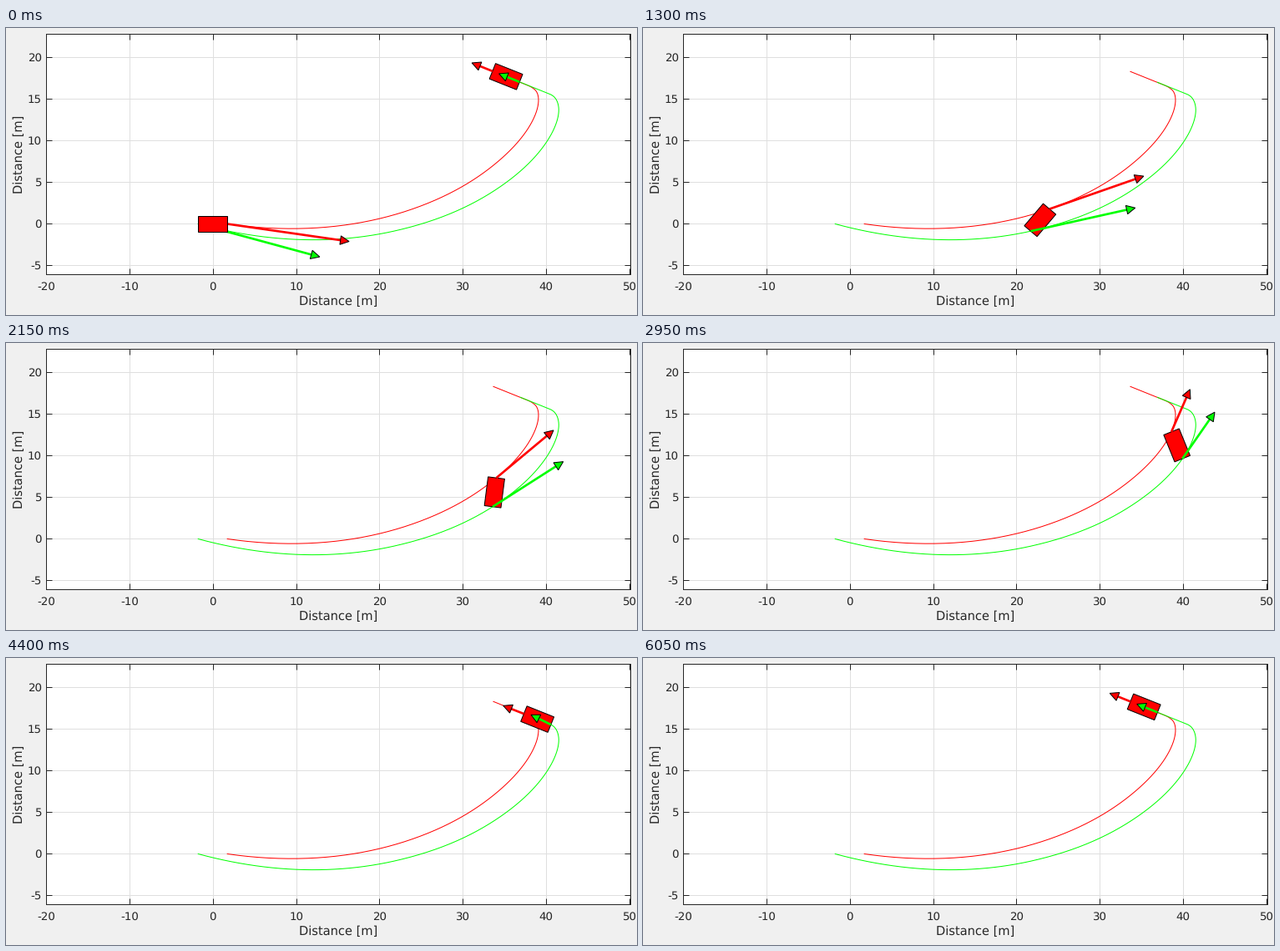
A matplotlib script that plays this animation: 756x345 px, repeating every 6100 ms.

```python
import numpy as np
import matplotlib.pyplot as plt
from matplotlib.animation import FuncAnimation
from matplotlib.transforms import Affine2D

W, H, DPI = 756, 345, 96
PX = 72 / DPI            # one pixel in points
SCALE = 9.986            # pixels per metre
FRAMES, STEP = 122, 0.05
RED, GREEN, INK = "#ff0000", "#00ff00", "#262626"

LF, LR, HALF_W = 1.7, 1.8, 1.0   # centre of mass to front, rear and side
GAIN, HEAD = 0.675, 1.05         # arrow length per speed, arrow head size

# Drift manoeuvre: time, x, y, heading, and the rates of the last three
KNOTS = np.array([
    (0.00,  0.00,  0.00,   0.0, 20.10, -4.15, 42.0),
    (1.25, 22.82,  0.50,  49.7, 16.14,  4.60, 38.7),
    (2.10, 33.76,  5.66,  82.7, 10.07,  7.35, 37.5),
    (2.90, 39.18, 11.32, 112.1,  3.74,  6.57, 38.5),
    (3.70, 39.99, 15.13, 143.8, -1.17,  2.70, 38.5),
    (4.40, 38.74, 16.28, 158.2, -2.22,  0.895, 0.0),
    (6.00, 35.20, 17.71, 158.2, -2.22,  0.895, 0.0),
])


def state(t):
    """Cubic Hermite value and rate of (x, y, heading)."""
    i = int(np.clip(np.searchsorted(KNOTS[:, 0], t) - 1, 0, len(KNOTS) - 2))
    a, b = KNOTS[i], KNOTS[i + 1]
    dt = b[0] - a[0]
    s = (t - a[0]) / dt
    p0, p1, m0, m1 = a[1:4], b[1:4], a[4:] * dt, b[4:] * dt
    c2 = 3 * (p1 - p0) - 2 * m0 - m1
    c3 = 2 * (p0 - p1) + m0 + m1
    return (p0 + s * (m0 + s * (c2 + s * c3)),
            (m0 + s * (2 * c2 + 3 * s * c3)) / dt)


def axles(t):
    """Side direction plus position and velocity of the front and rear points."""
    (x, y, h), (vx, vy, w) = state(t)
    h, w = np.radians((h, w))
    along = np.array([np.cos(h), np.sin(h)])
    side = np.array([-along[1], along[0]])
    pos, vel = np.array([x, y]), np.array([vx, vy])
    front = pos + LF * along, vel + LF * w * side
    rear = pos - LR * along, vel - LR * w * side
    return side, front, rear


def polygon(ax, n, color, z):
    shape, = ax.fill([0] * n, [0] * n, fc=color, ec="k", lw=PX,
                     joinstyle="miter", zorder=z, transform=centred)
    return shape


class Arrow:
    def __init__(self, ax, color, z):
        self.shaft, = ax.plot([], [], color=color, lw=2.67 * PX, zorder=z,
                              solid_capstyle="butt", transform=centred)
        self.head = polygon(ax, 3, color, z + 0.1)

    def set(self, start, vel):
        u = vel / np.hypot(*vel)
        n = np.array([-u[1], u[0]]) * HEAD / 2
        base = start + GAIN * vel
        self.shaft.set_data(*np.array([start, base]).T)
        self.head.set_xy([base + n, base + u * HEAD, base - n])

    def parts(self):
        return [self.shaft, self.head]


class Car:
    def __init__(self, ax, z_body, z_arrow):
        self.body = polygon(ax, 4, RED, z_body)
        self.front = Arrow(ax, RED, z_arrow)
        self.rear = Arrow(ax, GREEN, z_arrow + 0.2)

    def set(self, t):
        side, front, rear = axles(t)
        d = side * HALF_W
        f, r = front[0], rear[0]
        self.body.set_xy([f + d, f - d, r - d, r + d])
        self.front.set(*front)
        self.rear.set(*rear)

    def parts(self):
        return [self.body] + self.front.parts() + self.rear.parts()

    def show(self, on):
        for part in self.parts():
            part.set_visible(on)


plt.rcParams.update({"font.family": "DejaVu Sans", "axes.unicode_minus": False,
                     "text.hinting": "none"})
fig = plt.figure(figsize=(W / DPI, H / DPI), dpi=DPI, facecolor="#f0f0f0")

left, right, top, bottom, zero = 48, 748, 7, 296, 235
ax = fig.add_axes([left / W, 1 - bottom / H,
                   (right - left) / W, (bottom - top) / H])
ax.set_xlim(-20, -20 + (right - left) / SCALE)
ax.set_ylim((zero - bottom) / SCALE, (zero - top) / SCALE)
ax.set_xticks(range(-20, 51, 10))
ax.set_yticks(range(-5, 21, 5))
ax.set_axisbelow(True)
ax.grid(color="#dfdfdf", lw=PX)
ax.tick_params(direction="in", top=True, right=True, length=7 * PX, width=PX,
               color=INK, labelcolor=INK, labelsize=13.33 * PX)
ax.tick_params(axis="x", pad=8.5 * PX)
ax.tick_params(axis="y", pad=5 * PX)
for spine in ax.spines.values():
    spine.set(color=INK, linewidth=PX)

# Grid lines snap to pixel centres; free shapes need the same half pixel
centred = ax.transData + Affine2D().translate(0.5, -0.5)


def label(x, y, **kw):
    fig.text(x / W, 1 - y / H, "Distance [m]", size=14.67 * PX, color=INK,
             ha="center", va="baseline", **kw)


label(398.5, 333)
label(20, 152, rotation=90, rotation_mode="anchor")

track = [axles(t) for t in np.linspace(0, KNOTS[-1, 0], 481)]
for k, color in ((1, RED), (2, GREEN)):
    ax.plot(*np.array([p[k][0] for p in track]).T, color=color, lw=PX,
            zorder=2.5, transform=centred)

parked = Car(ax, z_body=4, z_arrow=3)
parked.set(0)
car = Car(ax, z_body=5, z_arrow=6)


def update(n):
    # The loop opens with the parked car beside the finished run
    parked.show(n == 0)
    car.set(((n - 1) % FRAMES) * STEP)
    return parked.parts() + car.parts()


anim = FuncAnimation(fig, update, frames=FRAMES, interval=STEP * 1000,
                     repeat=True, repeat_delay=0, blit=False)
plt.show()
```
